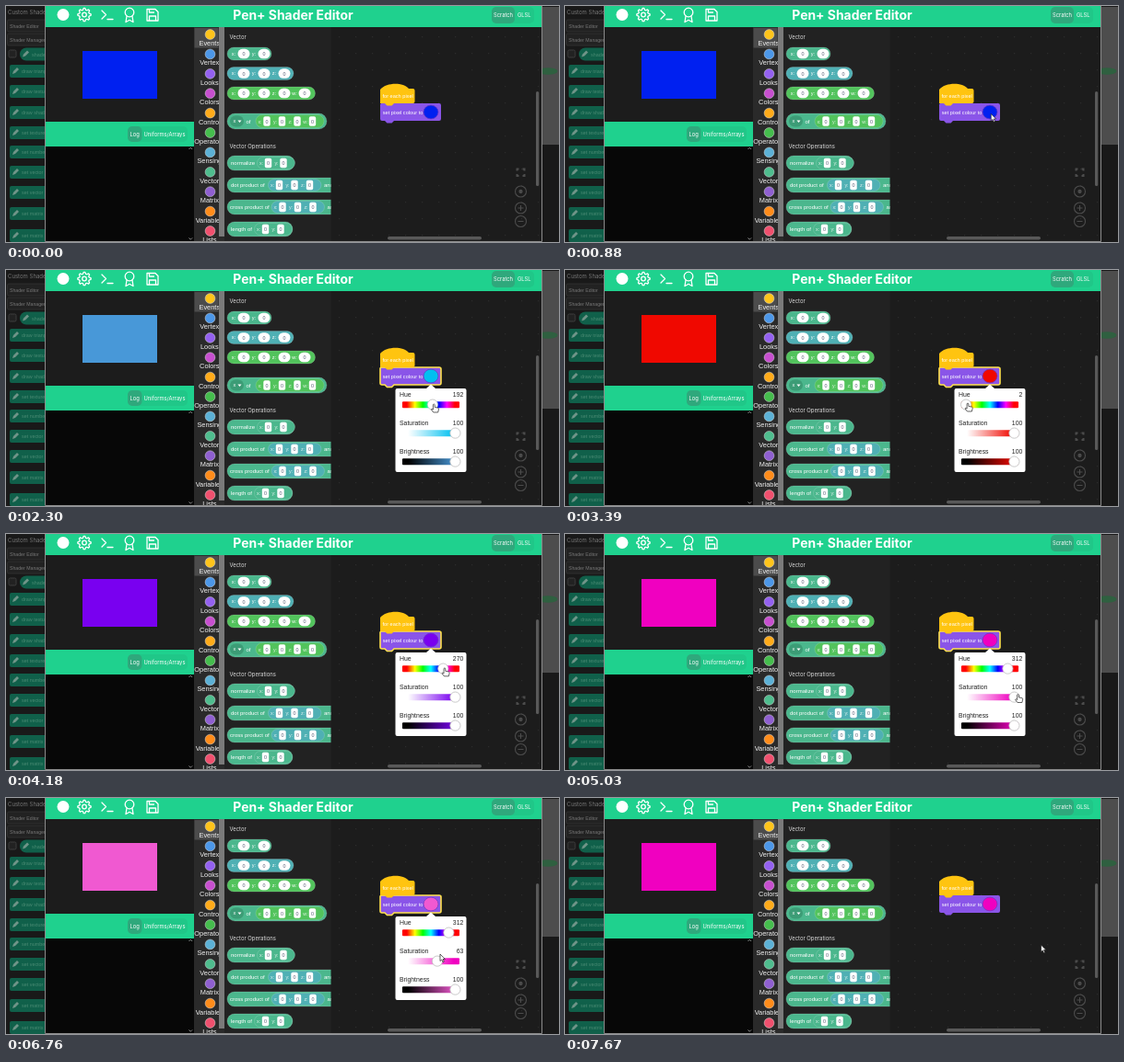
Write an HTML page that moves like this. It is 600 px wide and 257 px high and loops after 7.7 s.

```html
<!DOCTYPE html>
<html lang="en">
<head>
<meta charset="utf-8">
<title>Shader editor</title>
<style>
  html, body { margin: 0; width: 100%; height: 100%; overflow: hidden; background: #171717; }
  svg { display: block; width: 100vw; height: 100vh; }
  text { font-family: "Liberation Sans", Arial, sans-serif; white-space: pre; }
  .ui { font-family: Inter, "Open Sans", sans-serif; }
</style>
</head>
<body>
<svg id="stage" viewBox="0 0 600 257">
  <defs>
    <pattern id="dots" x="361" y="33" width="18" height="18" patternUnits="userSpaceOnUse">
      <rect width="1.2" height="1.2" fill="#2c2c2c"/>
    </pattern>
    <clipPath id="sideClip"><rect width="42" height="257"/></clipPath>
    <clipPath id="catClip"><rect x="204" y="23" width="27" height="233"/></clipPath>
    <clipPath id="flyClip"><rect x="237" y="23" width="115.5" height="233"/></clipPath>
    <linearGradient id="hueGrad"></linearGradient>
    <linearGradient id="satGrad"><stop offset=".1" stop-color="#fff"/><stop id="satEnd" offset=".9"/></linearGradient>
    <linearGradient id="valGrad"><stop offset=".1" stop-color="#000"/><stop id="valEnd" offset=".95"/></linearGradient>
  </defs>
</svg>
<script>
const LOOP = 7700;
const NS = "http://www.w3.org/2000/svg";
const stage = document.getElementById("stage");
const byId = id => document.getElementById(id);

function add(parent, tag, attrs, content) {
  const node = document.createElementNS(NS, tag);
  for (const key in attrs) node.setAttribute(key, attrs[key]);
  if (content !== undefined) node.textContent = content;
  parent.appendChild(node);
  return node;
}
const group = (attrs = {}, parent = stage) => add(parent, "g", attrs);
const rect = (p, x, y, width, height, fill, rx = 0, more = {}) =>
  add(p, "rect", { x, y, width, height, fill, rx, ...more });
const circle = (p, cx, cy, r, fill, more = {}) => add(p, "circle", { cx, cy, r, fill, ...more });
const path = (p, d, fill, more = {}) => add(p, "path", { d, fill, ...more });
const label = (p, x, y, size, content, fill = "#fff", more = {}) =>
  add(p, "text", { x, y, "font-size": size, fill, ...more }, content);
const mid = { "text-anchor": "middle" };

const GREEN = "#1fd18e", TAB = "#20c788", TAB_ON = "#2fa87c";
const MINT = "#4bb78d", TEAL = "#4fb0b4", LIME = "#52c35c";

// Dimmed page behind the editor
function buildPage() {
  const g = group({ "clip-path": "url(#sideClip)" });
  rect(g, 0, 0, 43, 257, "#191919");
  label(g, 2, 9, 6, "Custom Shaders", "#777", { class: "ui" });
  [["Shader Editor", 15], ["Shader Manager", 30]].forEach(([name, y]) => {
    rect(g, 1.5, y, 45, 13, "#222", 1.5, { stroke: "#383838", "stroke-width": .7 });
    label(g, 4, y + 8.6, 5.2, name, "#777");
  });
  rect(g, 3, 48, 8, 8, "#222", 1.5, { stroke: "#444", "stroke-width": .8 });
  const names = ["shader", "draw triangle", "draw textured", "draw shader", "set texture",
    "set number", "set vector", "set vector", "set matrix", "set matrix"];
  const rows = [52.5, 71, 93, 116, 138, 159, 181, 203, 226, 250];
  rows.forEach((y, i) => {
    const x = i ? 4 : 15;
    rect(g, x, y - 7, 60, 14, "#10604a", i ? 2 : 7);
    path(g, `M${x + 3} ${y + 3}l1-3 4-4 2 2-4 4z`, "#6f9488");
    label(g, x + 13, y + 2, 5.4, names[i], "#4a8a73");
  });
  rect(stage, 580, 0, 20, 257, "#191919");
  rect(stage, 580, 1, 20, 150, "#4d4d4d");
  add(stage, "ellipse", { cx: 588, cy: 71, rx: 10.5, ry: 3.8, fill: "#2f6040" });
}

function buildFrame() {
  rect(stage, 42, 0, 539, 256, "#1c1c1c");
  rect(stage, 352, 23, 229, 233, "url(#dots)");
  rect(stage, 42, 153, 162, 103, "#070707");
  rect(stage, 42, 126, 162, 27, GREEN);
  rect(stage, 42, 0, 539, 23, GREEN);
  path(stage, "M42.5 0V256.5H581.5V0", "none", { stroke: "#8a8a8a" });
  path(stage, "M198.5 156l1.8-1.8 1.8 1.8M198.5 252.5l1.8 1.8 1.8-1.8", "none",
    { stroke: "#aaa", "stroke-width": .8 });
  label(stage, 311.5, 14.7, 13.9, "Pen+ Shader Editor", "#fff",
    { class: "ui", "font-weight": 700, ...mid });

  circle(stage, 62, 9.5, 6.5, "#fff");
  const icons = group({ fill: "none", stroke: "#fff", "stroke-width": 1.3,
    "stroke-linecap": "round", "stroke-linejoin": "round" });
  let gear = "";
  for (let i = 0; i < 32; i++) {
    const a = (i - .5) * Math.PI / 16, r = i % 4 < 2 ? 7.2 : 5.4;
    gear += `${i ? "L" : "M"}${85 + r * Math.cos(a)} ${9.5 + r * Math.sin(a)}`;
  }
  path(icons, gear + "Z", "none");
  circle(icons, 85, 9.5, 2.3, "none");
  path(icons, "M104 5l4.5 4.5-4.5 4.5M110 14.5h6", "none");
  circle(icons, 134, 7, 4.8, "none");
  path(icons, "M131 11l-1 6.5 4-2.3 4 2.3-1-6.5", "none");
  path(icons, "M153 3.5h9l3 3v9.5h-12zM155.5 16v-5h7v5M155.5 3.5v3.5h5", "none");

  const tab = (x, y, text) => label(stage, x, y, 5.8, text, "#fff", { class: "ui", ...mid });
  rect(stage, 527, 1, 46, 18, TAB, 5);
  rect(stage, 527, 1, 25, 18, TAB_ON, 5);
  tab(539.5, 12, "Scratch");
  tab(562.2, 12, "GLSL");
  rect(stage, 132, 131, 65, 17, TAB, 5);
  rect(stage, 132, 131, 15.5, 17, TAB_ON, 5);
  tab(139.7, 141.8, "Log");
  tab(172, 141.8, "Uniforms/Arrays");
}

function buildCategories() {
  rect(stage, 204, 23, 33, 233, "#2a2a2a");
  rect(stage, 204.5, 24, 26, 21.5, "#4c4c4c");
  rect(stage, 231, 23, 6, 228, "#7a7a7a");
  const g = group({ "clip-path": "url(#catClip)" });
  const list = [["Events", "#ffc41a"], ["Vertex", "#4c97e8"], ["Looks", "#9461f0"],
    ["Colors", "#c74fcf"], ["Control", "#ffab19"], ["Operators", "#45bd4d"],
    ["Sensing", "#5cb1d6"], ["Vector", "#4fbd8e"], ["Matrix", "#8f5fd0"],
    ["Variables", "#ff8c1a"], ["Lists", "#f0506e"]];
  list.forEach(([name, color], i) => {
    const y = 31 + i * 21.4;
    circle(g, 221.5, y, 5.4, color, { stroke: "#ddd", "stroke-width": .5 });
    label(g, 220.8, y + 12, 7.4, name, "#f2f2f2", mid);
  });
}

function buildFlyout() {
  const g = group({ "clip-path": "url(#flyClip)" });
  rect(g, 237, 23, 116, 233, "#222");
  label(g, 242.5, 36, 5.9, "Vector", "#ddd", { class: "ui" });
  label(g, 242.5, 155, 5.9, "Vector Operations", "#ddd", { class: "ui" });

  const pill = (x, y, w, h, fill) =>
    rect(g, x, y, w, h, fill, h / 2, { stroke: "#ffffff40", "stroke-width": .6 });
  const axes = "xyzw";

  [[2, 45, 48, MINT], [3, 66.5, 72, TEAL], [4, 88, 95.5, LIME]].forEach(([n, y, w, fill]) => {
    pill(240, y, w, 14, fill);
    for (let i = 0; i < n; i++) {
      const x = 258 + i * 22;
      label(g, x - 11, y + 8.6, 5.6, axes[i] + ":", "#fff", mid);
      rect(g, x - 6.5, y + 1.8, 13, 10.4, "#fff", 5.2);
      label(g, x, y + 9, 5.4, "0", "#575e75", mid);
    }
  });

  // Reporter with a nested vector; first is the centre of its first input
  function reporter(y, w, h, text, tx, first, n, fill, tail) {
    const base = y + h / 2 + 2;
    pill(240, y, w, h, MINT);
    label(g, tx, base, 6, text);
    pill(first - 12, y + 1.5, n * 16.5 + 8, h - 3, fill);
    for (let i = 0; i < n; i++) {
      const x = first + i * 16.5;
      label(g, x - 7.5, base, 5.4, axes[i] + ":", "#ffffffd0", mid);
      rect(g, x - 3.7, y + h / 2 - 5.3, 7.4, 10.6, "#fff", 1.8);
      label(g, x, base, 5.4, "0", "#575e75", mid);
    }
    if (tail) label(g, first + n * 16.5 - 1, base, 6, tail);
  }
  reporter(117, 108, 17, "of", 260.5, 283, 4, LIME);
  rect(g, 243, 119.5, 15, 12, "#3c9c76", 6);
  label(g, 246.5, 127.4, 5.6, "x");
  path(g, "M251.5 124.5h4l-2 2.6z", "#fff");
  reporter(163, 73, 16, "normalize", 244, 284.5, 2, MINT);
  reporter(187, 140, 16, "dot product of", 244, 296.5, 3, TEAL, "and");
  reporter(211, 140, 16, "cross product of", 243, 300, 3, TEAL, "and");
  reporter(235, 71, 16, "length of", 244, 281.5, 2, MINT);
}

function buildWorkspace() {
  rect(stage, 414, 251, 102, 3.5, "#595959", 1.7);
  rect(stage, 575, 93, 3.2, 103, "#595959", 1.6);
  const g = group({ fill: "none", stroke: "#4c4c4c", "stroke-width": 1.1 });
  path(g, "M554.5 179.5v-2h2M560.5 177.5h2v2M562.5 183v2h-2M556.5 185h-2v-2", "none",
    { "stroke-width": 2 });
  [202, 220, 234.5].forEach(y => circle(g, 558.5, y, 6, "none"));
  circle(g, 558.5, 202, 1.6, "#4c4c4c");
  path(g, "M555.5 220h6M558.5 217v6M555.5 234.5h6", "none");
}

function buildScript() {
  const set = path(stage, "M407 106H470Q472 106 472 108V123Q472 125 470 125H421L418.5 127.5H413.5L411 125H408Q406 125 406 123V107Z",
    "#8a55e8");
  path(stage, "M406 91C413 83 431 83 437 90H441.5Q443.5 90 443.5 92V104Q443.5 106 441.5 106H421L418.5 108.5H413.5L411 106H406Z",
    "#ffc410");
  label(stage, 408.5, 100, 5.6, "for each pixel");
  label(stage, 408.8, 117.5, 5.6, "set pixel colour to");
  const swatch = add(stage, "ellipse", { cx: 461, cy: 115.5, rx: 8, ry: 7.4,
    stroke: "#6a3bc0", "stroke-width": .7 });
  return { set, swatch };
}

function buildPopup() {
  const g = group();
  path(g, "M422.5 131Q422.5 129 424.5 129H456L461 124.5 466 129H497.5Q499.5 129 499.5 131V218Q499.5 220 497.5 220H424.5Q422.5 220 422.5 218Z",
    "#fff");
  for (let i = 0; i <= 6; i++)
    add(byId("hueGrad"), "stop", { offset: .08 + i * .14, "stop-color": `hsl(${i * 60},100%,50%)` });
  const rows = [["Hue", "hueGrad"], ["Saturation", "satGrad"], ["Brightness", "valGrad"]];
  const sliders = rows.map(([name, fill], i) => {
    const y = 138.4 + i * 31;
    label(g, 427, y, 6.9, name, "#222");
    const value = label(g, 496.3, y, 6.9, "100", "#222", { "text-anchor": "end" });
    rect(g, 430, y + 4.8, 62, 7, `url(#${fill})`, 1);
    const thumb = circle(g, 487.5, y + 8.2, 5.6, "#fff", { stroke: "#bbb", "stroke-width": .8 });
    return { value, thumb };
  });
  return { g, sliders };
}

function buildCursor() {
  const g = group({ stroke: "#222", "stroke-width": .7, "stroke-linejoin": "round" });
  const arrow = path(g, "M0 0V7.6L1.8 6 3 8.8 4.3 8.2 3.1 5.5H5.4Z", "#fff");
  const hand = path(g, "M-.9 .6Q0-.6 .9 .6V3.4L4.6 4.2Q5.4 4.5 5.2 5.6L4.4 9H-.6L-3 5.8Q-2.6 4.6-.9 6Z", "#fff");
  return { g, arrow, hand };
}

buildPage();
buildFrame();
const preview = rect(stage, 83, 49, 81, 52, "#00f");
buildCategories();
buildFlyout();
buildWorkspace();
const script = buildScript();
const popup = buildPopup();
const cursor = buildCursor();

// Each key: time, then values
const hueKeys = [[1700, 232], [2300, 192], [3150, 2], [3450, 2], [4400, 312]];
const satKeys = [[5150, 100], [5900, 40], [6450, 63], [6850, 63], [7050, 100]];
const cursorKeys = [
  [300, 540, 262], [900, 462, 117], [1150, 462, 117], [1420, 463.5, 130], [1700, 470, 146],
  [2300, 464.3, 146], [3150, 437, 145], [3450, 437, 145], [4400, 482, 146], [4600, 482, 146],
  [4950, 491.5, 174.5], [5150, 491.5, 174.5], [5900, 459, 175], [6450, 471, 175],
  [6700, 471, 170], [6780, 471, 170], [6850, 470, 175], [7050, 490, 176], [7500, 516.5, 160]];

function sample(keys, t) {
  if (t <= keys[0][0]) return keys[0].slice(1);
  const i = keys.findIndex(k => k[0] > t);
  if (i < 0) return keys[keys.length - 1].slice(1);
  const a = keys[i - 1], b = keys[i];
  const u = (t - a[0]) / (b[0] - a[0]), e = u * u * (3 - 2 * u);
  return a.slice(1).map((v, j) => v + (b[j + 1] - v) * e);
}

function hsv(h, s, v) {
  return [5, 3, 1].map(n => {
    const k = (n + h / 60) % 6;
    return 255 * v * (1 - s * Math.max(0, Math.min(k, 4 - k, 1)));
  });
}
const rgb = c => `rgb(${c.map(Math.round).join()})`;
const show = (node, on) => node.setAttribute("visibility", on ? "inherit" : "hidden");
const within = (t, a, b) => t >= a && t < b;

function draw(t) {
  const [hue] = sample(hueKeys, t), [sat] = sample(satKeys, t);
  const color = hsv(hue, sat / 100, .94);
  // Cyan shows duller on the canvas than in the picker
  const dull = Math.max(0, 1 - Math.abs(hue - 192) / 35);
  const soft = rgb(color.map((v, i) => v + ([72, 152, 216][i] - v) * dull));
  preview.setAttribute("fill", soft);
  script.swatch.setAttribute("fill", rgb(color));
  byId("satEnd").setAttribute("stop-color", rgb(hsv(hue, 1, .94)));
  byId("valEnd").setAttribute("stop-color", soft);

  const open = within(t, 1100, 7200);
  show(popup.g, open);
  script.set.setAttribute("stroke", open ? "#ffe34d" : "none");
  script.set.setAttribute("stroke-width", 1.6);
  [[hue, 360], [sat, 100], [100, 100]].forEach(([v, max], i) => {
    popup.sliders[i].value.textContent = Math.round(v);
    popup.sliders[i].thumb.setAttribute("cx", 434.8 + 52.6 * v / max);
  });

  const [x, y] = sample(cursorKeys, t);
  const pointing = within(t, 1600, 6600) || within(t, 6830, 7100);
  cursor.g.setAttribute("transform", `translate(${x} ${y})`);
  show(cursor.g, t > 300);
  show(cursor.arrow, !pointing);
  show(cursor.hand, pointing);
}

const start = performance.now();
function tick() {
  draw((performance.now() - start) % LOOP);
  requestAnimationFrame(tick);
}
tick();
</script>
</body>
</html>
```
